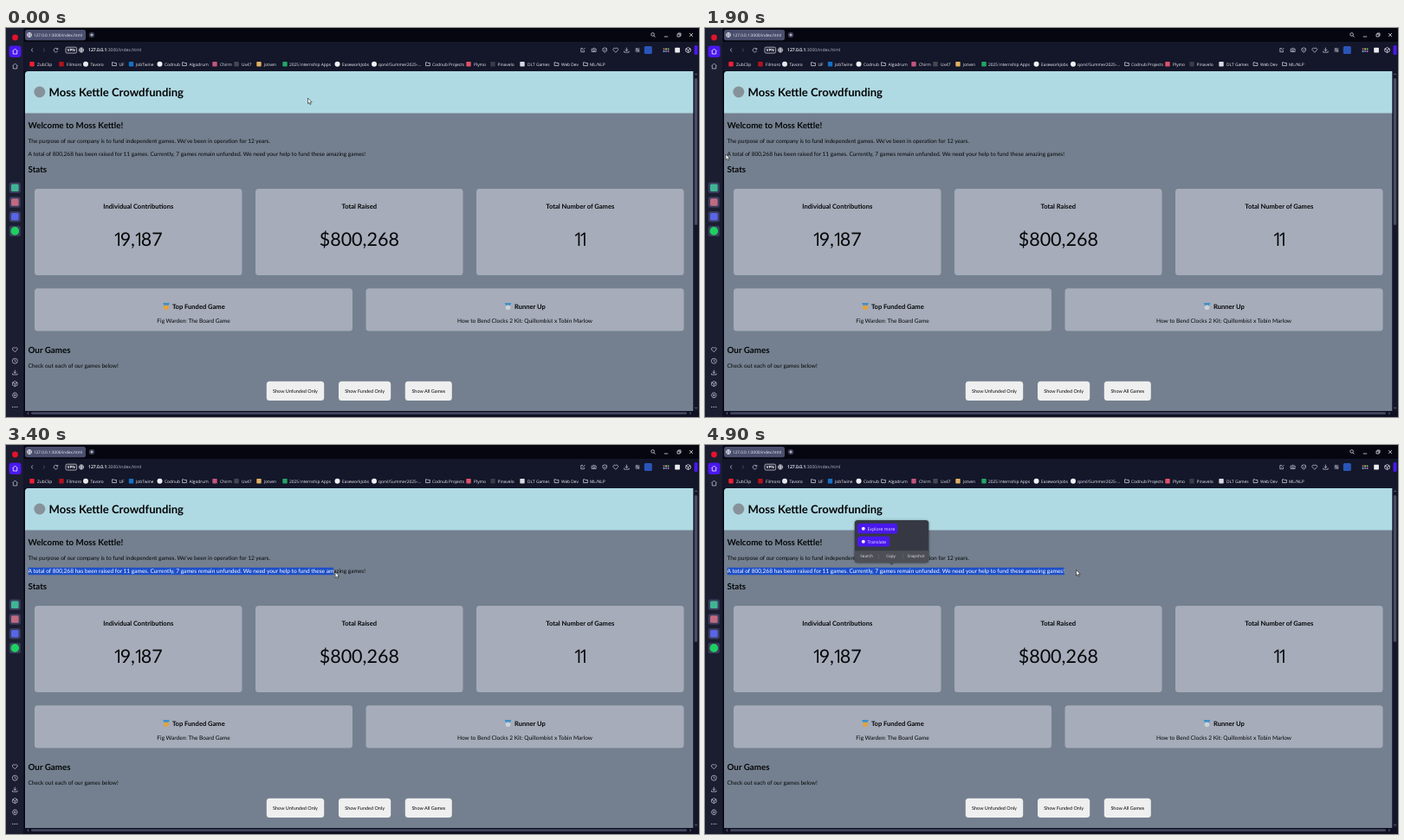
Recreate the animation shown at these times as an HTML page with a canvas. Size 800x450 px, loop 5 s.

```html
<!DOCTYPE html>
<html lang="en">
<head>
<meta charset="utf-8">
<title>Crowdfunding page</title>
<style>
html, body { margin: 0; width: 100%; height: 100%; overflow: hidden; background: #05060f; }
canvas { display: block; width: 800px; height: 450px; }
</style>
</head>
<body>
<canvas id="stage"></canvas>
<script>
const canvas = document.getElementById('stage');
const dpr = window.devicePixelRatio || 1;
canvas.width = 800 * dpr;
canvas.height = 450 * dpr;
const ctx = canvas.getContext('2d');
// Unhinted glyphs keep small sizes true to scale.
ctx.textRendering = 'geometricPrecision';

const LOOP = 5000, STEP = 100;
const PAGE = 'Lato, sans-serif', UI = '"Open Sans", sans-serif';
const INK = '#050608', LIGHT = '#e4e5ee', PURPLE = '#4a18ee', BLUE = '#1d4fc8';
const BODY = `6.55px ${PAGE}`, H2 = `bold 9.8px ${PAGE}`, H3 = `bold 7.55px ${PAGE}`;
const LINE = 'A total of 800,268 has been raised for 11 games. Currently, 7 games remain unfunded. We need your help to fund these amazing games!';

function text(str, x, y, font, color = INK, align = 'left') {
  ctx.font = font;
  ctx.fillStyle = color;
  ctx.textAlign = align;
  ctx.fillText(str, x, y);
}

function box(x, y, w, h, color, r = 0) {
  ctx.fillStyle = color;
  ctx.beginPath();
  ctx.roundRect(x, y, w, h, r);
  ctx.fill();
}

function dot(x, y, r, color) {
  ctx.fillStyle = color;
  ctx.beginPath();
  ctx.arc(x, y, r, 0, Math.PI * 2);
  ctx.fill();
}

function icon(d, x, y, color = '#c3c5d4', width = 0.75) {
  ctx.save();
  ctx.translate(x, y);
  ctx.strokeStyle = color;
  ctx.lineWidth = width;
  ctx.stroke(new Path2D(d));
  ctx.restore();
}

const ICONS = {
  left: 'M1.2-2L-1 0L1.2 2',
  right: 'M-1.2-2L1 0L-1.2 2',
  reload: 'M2-1A2.3 2.3 0 1 0 2.2 .8M2.3-2.5V-.8H.6',
  globe: 'M-2.6 0A2.6 2.6 0 1 0 2.6 0A2.6 2.6 0 1 0-2.6 0H2.6M0-2.6Q-2 0 0 2.6Q2 0 0-2.6',
  home: 'M-3 0L0-3L3 0M-2.2-.6V3H2.2V-.6',
  heart: 'M0 2.8L-2.7 0A1.6 1.6 0 0 1 0-1.7A1.6 1.6 0 0 1 2.7 0Z',
  clock: 'M-3 0A3 3 0 1 0 3 0A3 3 0 1 0-3 0M0-1.8V.2L1.3 1',
  down: 'M0-2.8V1M-1.7-.7L0 1L1.7-.7M-2.8 1.2V2.6H2.8V1.2',
  cube: 'M0-3L2.7-1.5V1.6L0 3L-2.7 1.6V-1.5ZM-2.7-1.5L0 0L2.7-1.5M0 0V3',
  gear: 'M-1.3-2.8H1.3L3 0L1.3 2.8H-1.3L-3 0ZM-1 0A1 1 0 1 0 1 0A1 1 0 1 0-1 0',
  search: 'M-2.2-.6A1.8 1.8 0 1 0 1.4-.6A1.8 1.8 0 1 0-2.2-.6M.9 .9L2.5 2.5',
  minus: 'M-2.2 2H2.2',
  restore: 'M-2-1H1V2H-2ZM-1-1V-2H2V1H1',
  close: 'M-2-2L2 2M2-2L-2 2',
  plus: 'M-1.6 0H1.6M0-1.6V1.6',
  edit: 'M1.5 .3V2.2H-2.2V-2H0M-.7 .7L2.4-2.4',
  camera: 'M-2.5-1.4H-1L-.5-2.2H.5L1-1.4H2.5V2H-2.5ZM-.9 .3A.9 .9 0 1 0 .9 .3A.9 .9 0 1 0-.9 .3',
  shield: 'M0-2.6L2.3-1.8V.4Q2 1.8 0 2.7Q-2 1.8-2.3 .4V-1.8ZM-.9 0L-.1 .8L1.1-.8',
  sliders: 'M-2.4-1.6H2.4M-2.4 0H2.4M-2.4 1.6H2.4M-.8-2.4V-.8M1 .8V2.4',
  folder: 'M-2.4 1.9V-1.9H-.6L.1-1.2H2.4V1.9Z'
};

function mark(kind, x, y, color) {
  if (kind === 'folder') icon(ICONS.folder, x, y, LIGHT, 0.7);
  else if (kind === 'dot') dot(x, y, 3, color);
  else box(x - 2.7, y - 2.7, 5.4, 5.4, color, 0.7);
}

const BOOKMARKS = [
  ['box', 30, 36, 'ZubClip', '#ee2032'], ['box', 64, 70, 'Filmoro', '#b5121d'],
  ['dot', 92, 97.5, 'Tavoro', '#e8e8ea'], ['folder', 125, 130.5, 'UF'],
  ['box', 144.5, 150, 'JobTwine', '#1671c4'], ['dot', 177.5, 183, 'Codnub', '#f0f0f4'],
  ['folder', 206, 211.5, 'Algodrum'], ['box', 241, 247, 'Chirm', '#c4547e'],
  ['box', 266, 272, 'Ux47', '#45474f'], ['box', 292, 298, 'Jotven', '#dfb05f'],
  ['box', 322, 327, '2025 Internship Apps', '#23a566'], ['dot', 382.5, 388, 'EaseworkJobs', '#f0f0f4'],
  ['dot', 425, 430, 'qorvl/Summer2025-...', '#f0f0f4'], ['folder', 487, 492, 'Codnub Projects'],
  ['box', 534, 540, 'Plymo', '#e0506a'], ['box', 562, 567.5, 'Pinavelo', '#3a3c48'],
  ['box', 596, 602, 'DLT Games', '#d9d9de'], ['folder', 635.5, 641, 'Web Dev'],
  ['folder', 669, 674, 'ML/NLP']
];

function drawSidebar() {
  box(0, 0, 20.5, 450, '#1b1d31');
  dot(10.5, 11, 3.4, '#e3122d');
  box(3.5, 20.5, 14, 13.5, PURPLE, 3);
  icon(ICONS.home, 10.5, 27, '#fff');
  icon(ICONS.home, 10.5, 44);
  ['#3fb595', '#c06a80', '#5865e8', '#1ed05f'].forEach((color, i) => {
    const y = 184.8 + i * 16.7;
    box(3.8, y - 6.2, 13, 12.4, '#3a3e5c', 2.5);
    if (i === 3) dot(10.3, y, 4.8, color);
    else box(6, y - 4.2, 8.6, 8.4, color, 1.5);
  });
  ['heart', 'clock', 'down', 'cube', 'gear'].forEach((name, i) => icon(ICONS[name], 10.3, 372 + i * 13.2));
  for (let x = 7.8; x < 14; x += 2.5) dot(x, 438.3, 0.65, LIGHT);
}

function drawChrome() {
  box(0, 0, 800, 450, '#05060f');
  box(20.5, 16, 779.5, 34, '#14172a');
  drawSidebar();

  box(22, 2, 70, 12.2, '#4b4f6e', 2.5);
  icon(ICONS.globe, 27, 8, LIGHT);
  const url = '127.0.0.1:3000/index.html';
  text(url, 32, 9.8, `4.65px ${UI}`, '#f2f2f7');
  dot(99, 8, 3.3, '#343850');
  icon(ICONS.plus, 99, 8, '#fff');
  [['search', 747], ['minus', 762], ['restore', 777], ['close', 791]]
    .forEach(([name, x]) => icon(ICONS[name], x, 8, LIGHT));

  icon(ICONS.left, 30, 25.5);
  icon(ICONS.right, 44, 25.5, '#565a70');
  icon(ICONS.reload, 57.5, 25.5);
  ctx.strokeStyle = LIGHT;
  ctx.lineWidth = 0.7;
  ctx.beginPath();
  ctx.roundRect(69, 22.2, 12.6, 6.8, 1.5);
  ctx.stroke();
  text('VPN', 75.3, 27.3, `bold 4.5px ${UI}`, '#fff', 'center');
  icon(ICONS.globe, 87, 25.5, LIGHT);
  text(url, 95, 27.4, `5.05px ${UI}`, '#b9bbc9');
  text('127.0.0.1', 95, 27.4, `5.05px ${UI}`, '#fff');
  ['edit', 'camera', 'shield', 'heart', 'down', 'sliders']
    .forEach((name, i) => icon(ICONS[name], 666 + i * 12.6, 25.5));
  box(736.8, 21, 9, 9, '#2a55b8', 1.5);
  for (let i = 0; i < 6; i++) {
    box(758.7 + (i % 3) * 2.5, 23.5 + Math.floor(i / 3) * 2.6, 1.7, 1.7, `hsl(${i * 63},55%,65%)`);
  }
  box(772.2, 22.7, 5.7, 5.7, '#ececf0', 0.7);
  icon(ICONS.cube, 787.5, 25.5, LIGHT);
  box(794.5, 20, 4, 11, PURPLE, 1.5);

  for (const [kind, ix, tx, name, color] of BOOKMARKS) {
    mark(kind, ix, 41.7, color);
    text(name, tx, 43.5, `4.85px ${UI}`, '#f0f0f5');
  }
}

// Proportional figures: a plain, narrow "1" among round digits.
function figures(str, cx, y, size) {
  const fontOf = c => `${size}px ${c === '1' ? UI : PAGE}`;
  const advance = c => {
    ctx.font = fontOf(c);
    return c === '1' ? size * 0.31 : ctx.measureText(c).width;
  };
  let x = cx - [...str].reduce((sum, c) => sum + advance(c), 0) / 2;
  for (const c of str) {
    text(c, x - (c === '1' ? size * 0.07 : 0), y, fontOf(c));
    x += advance(c);
  }
}

function medal(x, y, color) {
  ctx.fillStyle = '#3f8fc8';
  ctx.beginPath();
  ctx.moveTo(x - 4, y - 4);
  ctx.lineTo(x + 4, y - 4);
  ctx.lineTo(x + 1.2, y + 1);
  ctx.lineTo(x - 1.2, y + 1);
  ctx.fill();
  dot(x, y + 1.3, 2.8, color);
}

function drawPage() {
  ctx.save();
  ctx.beginPath();
  ctx.roundRect(22, 50, 771.5, 393, [4, 0, 0, 0]);
  ctx.clip();
  box(22, 50, 772, 393, '#74808f');
  box(22, 50, 772, 48.6, '#b0dae3');
  ctx.restore();

  dot(38.8, 74, 6.5, '#879199');
  text('Moss Kettle Crowdfunding', 49.5, 79, `bold 13.1px ${PAGE}`);
  text('Welcome to Moss Kettle!', 25.5, 116.4, H2);
  text("The purpose of our company is to fund independent games. We've been in operation for 12 years.", 25.5, 133.3, BODY);
  text(LINE, 25.5, 148, BODY);
  text('Stats', 25.5, 167.4, H2);

  const card = '#a6acb9';
  [['Individual Contributions', '19,187'], ['Total Raised', '$800,268'], ['Total Number of Games', '11']]
    .forEach(([title, value], i) => {
      const x = 33 + i * 255;
      box(x, 186, 239.5, 100, card, 3.5);
      text(title, x + 119.8, 209.2, H3, INK, 'center');
      figures(value, x + 119.8, 252.3, 21.5);
    });

  box(33, 301.3, 367, 49.2, card, 3.5);
  box(415.5, 301.3, 367, 49.2, card, 3.5);
  medal(185, 322, '#e5a23d');
  text('Top Funded Game', 192, 325, H3);
  text('Fig Warden: The Board Game', 216.5, 340.9, BODY, INK, 'center');
  medal(579.5, 322, '#c9d2d8');
  text('Runner Up', 587, 325, H3);
  text('How to Bend Clocks 2 Kit: Quillombist x Tobin Marlow', 599, 340.9, BODY, INK, 'center');

  text('Our Games', 25.5, 375.9, H2);
  text('Check out each of our games below!', 25.5, 393, BODY);
  [['Show Unfunded Only', 300.8, 66.4], ['Show Funded Only', 384, 60.2], ['Show All Games', 460.8, 54]]
    .forEach(([label, x, w]) => {
      box(x, 408.7, w, 22.3, '#efeff0', 3.5);
      text(label, x + w / 2, 422.1, `5.5px ${PAGE}`, INK, 'center');
    });

  box(793.5, 50, 6.5, 393, '#14162a');
  box(794.8, 58, 3.4, 170, '#4a4d66', 1.7);
  box(20.5, 443, 779.5, 7, '#0f1122');
  box(29, 444.3, 757, 2.8, '#43465e', 1.4);
  const arrow = '#8a8da0';
  icon('M-1.2 .7L0-.7L1.2 .7', 796.6, 53.5, arrow);
  icon('M-1.2-.7L0 .7L1.2-.7', 796.6, 439.5, arrow);
  icon('M.7-1.2L-.7 0L.7 1.2', 25.5, 445.7, arrow);
  icon('M-.7-1.2L.7 0L-.7 1.2', 790, 445.7, arrow);
}

function highlight(str, x, y, font, top, h, width) {
  ctx.save();
  ctx.beginPath();
  ctx.rect(x, top, width, h);
  ctx.clip();
  box(x, top, width, h, BLUE);
  text(str, x, y, font, '#fff');
  ctx.restore();
}

function drawSelection(t, cursor) {
  if (t <= 1900) return;
  const below = cursor.y > 149.5;
  ctx.font = BODY;
  const full = ctx.measureText(LINE).width;
  let width = full + (below ? 1.6 : 0);
  if (!below && cursor.x < 25.5 + full) {
    width = 0;
    for (let n = 1; n <= LINE.length; n++) {
      const w = ctx.measureText(LINE.slice(0, n)).width;
      if (25.5 + w > cursor.x + 1) break;
      width = w;
    }
  }
  highlight(LINE, 25.5, 148, BODY, 141.4, 9, width);
  if (below) {
    ctx.font = H2;
    highlight('Stats', 25.5, 167.4, H2, 157.6, 12.6, ctx.measureText('Stats').width);
  }
}

function drawPopup() {
  ctx.save();
  ctx.shadowColor = 'rgba(0,0,0,.35)';
  ctx.shadowBlur = 3 * dpr;
  box(172.7, 87, 85.6, 49.3, '#363944', 3.5);
  ctx.restore();
  box(172.7, 122.2, 85.6, 14.1, '#4d4f57', [0, 0, 3.5, 3.5]);
  ctx.fillStyle = '#4d4f57';
  ctx.beginPath();
  ctx.moveTo(212, 136);
  ctx.lineTo(219, 136);
  ctx.lineTo(215.5, 139);
  ctx.fill();
  [['Explore more', 90.8, 46], ['Translate', 105.8, 37]].forEach(([label, y, w]) => {
    box(176, y, w, 11.6, PURPLE, 2.5);
    dot(182.8, y + 5.9, 2, '#efeaff');
    text(label, 187.5, y + 7.7, `5.1px ${UI}`, '#efeaff');
  });
  [['Search', 186.5], ['Copy', 214.5], ['Snapshot', 243.5]]
    .forEach(([label, x]) => text(label, x, 130.3, `4.6px ${UI}`, '#e2e2e6', 'center'));
  box(200, 126, 0.5, 6, '#6a6c74');
  box(228.5, 126, 0.5, 6, '#6a6c74');
}

// Cursor stops: time, x, y
const PATH = [[0, 348.5, 81], [600, 83, 82.5], [1900, 24, 146], [3000, 305.5, 151], [3700, 428.5, 144.5]];

function cursorAt(t) {
  const i = PATH.findIndex(p => p[0] > t);
  if (i < 0) return { x: 428.5, y: 144.5 };
  const [t0, x0, y0] = PATH[i - 1], [t1, x1, y1] = PATH[i];
  const k = (t - t0) / (t1 - t0), e = k * k * (3 - 2 * k);
  return { x: x0 + (x1 - x0) * e, y: y0 + (y1 - y0) * e };
}

function drawCursor({ x, y }) {
  ctx.save();
  ctx.translate(x, y);
  const arrow = new Path2D('M0 0V6.6L1.5 5.2L2.6 7.6L3.6 7.1L2.6 4.8H4.7Z');
  ctx.fillStyle = '#fff';
  ctx.fill(arrow);
  ctx.strokeStyle = '#16181c';
  ctx.lineWidth = 0.6;
  ctx.stroke(arrow);
  ctx.restore();
}

function draw(t) {
  ctx.setTransform(dpr, 0, 0, dpr, 0, 0);
  drawChrome();
  drawPage();
  const cursor = cursorAt(t);
  drawSelection(t, cursor);
  if (t >= 4400) drawPopup();
  if (t < 900 || t > 1500) drawCursor(cursor);
}

let last = -1;
const start = performance.now();
function tick() {
  const elapsed = Math.max(0, performance.now() - start) % LOOP;
  const t = Math.floor(elapsed / STEP) * STEP;
  if (t !== last) draw(last = t);
  requestAnimationFrame(tick);
}
tick();
</script>
</body>
</html>
```
